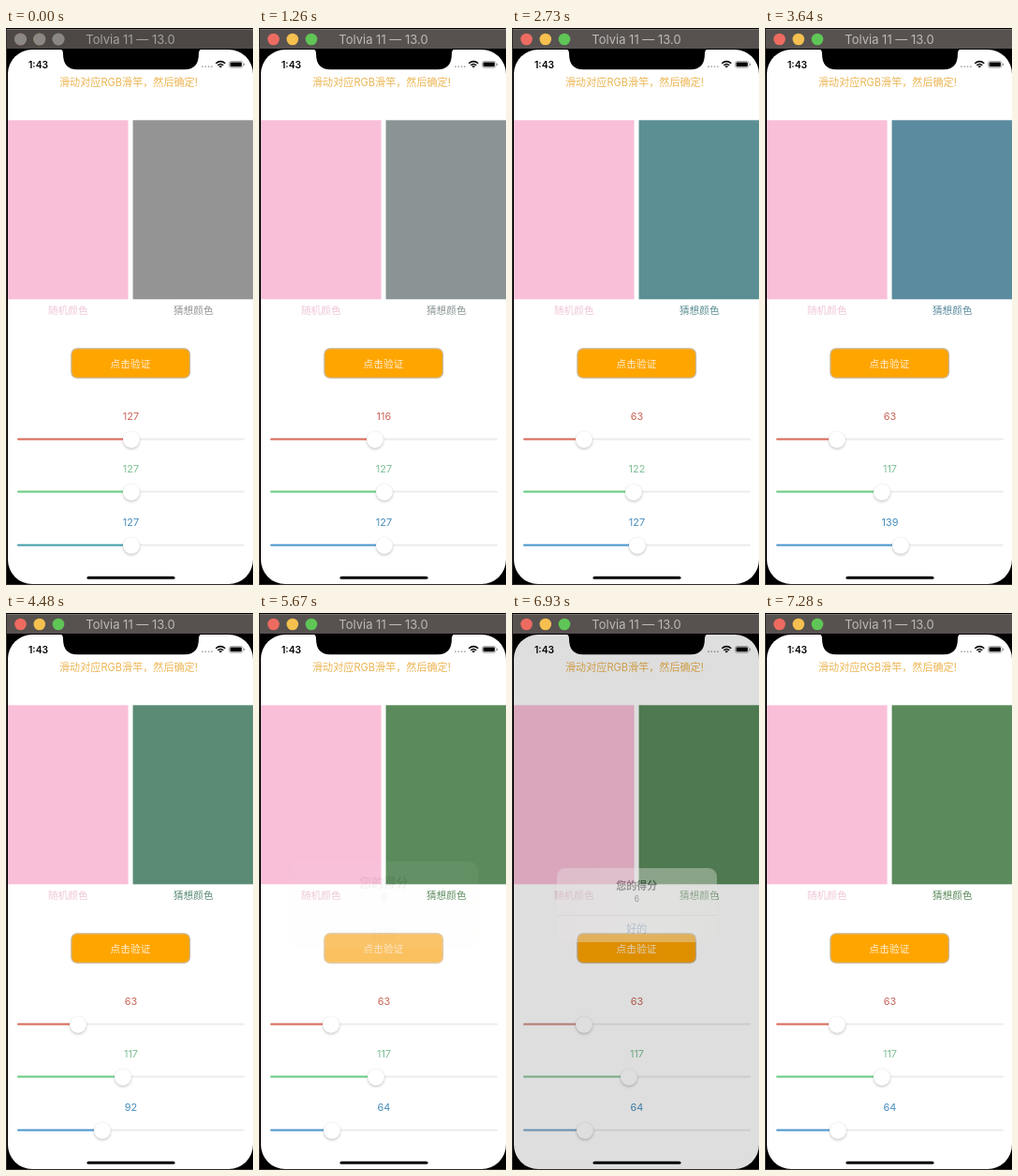
These frames come from a looping animation (264x594 px, 7350 ms). An HTML page:

```html
<!DOCTYPE html>
<html lang="zh">
<head>
<meta charset="utf-8">
<title>RGB</title>
<style>
@property --r { syntax: "<integer>"; inherits: true; initial-value: 127; }
@property --g { syntax: "<integer>"; inherits: true; initial-value: 127; }
@property --b { syntax: "<integer>"; inherits: true; initial-value: 127; }

html, body { margin: 0; width: 100%; height: 100%; overflow: hidden; background: #000; }
body {
  --loop: 7350ms;
  position: relative;
  font: 11px Inter, "Noto Sans CJK SC", "Noto Sans CJK", sans-serif;
  animation: red var(--loop) infinite, green var(--loop) infinite, blue var(--loop) infinite;
  animation-timing-function: ease-in-out;
}
svg { position: absolute; left: 0; top: 0; }
.mid { text-anchor: middle; }
.label { text-anchor: middle; font-size: 10.7px; }
.guess { fill: rgb(calc(36 + .88 * var(--r)), calc(36 + .88 * var(--g)), calc(36 + .88 * var(--b))); }

@keyframes red { 0%, 14.5% { --r: 127; } 23.81%, 100% { --r: 63; } }
@keyframes green { 0%, 33.33% { --g: 127; } 40.95%, 100% { --g: 117; } }
@keyframes blue { 0%, 46.67% { --b: 127; } 52.38% { --b: 150; } 66.67%, 100% { --b: 64; } }

/* window focus */
.bar { animation: bar var(--loop) linear infinite; }
.name { animation: name var(--loop) linear infinite; }
.idle { animation: idle var(--loop) linear infinite; }
@keyframes bar { 0%, 4.75% { fill: #4d4845; } 4.76%, 100% { fill: #575250; } }
@keyframes name { 0%, 4.75% { fill: #a5a19f; } 4.76%, 100% { fill: #bdb9b8; } }
@keyframes idle { 0%, 4.75% { opacity: 1; } 4.76%, 100% { opacity: 0; } }

/* sliders */
.slider { position: absolute; left: 0; width: 264px; height: 44px; --x: calc(21px + .89px * var(--v)); }
.slider::before {
  counter-reset: n var(--v);
  content: counter(n);
  position: absolute; left: 1.5px; width: 264px;
  line-height: 14px; text-align: center; color: var(--ink);
}
.slider i { position: absolute; left: 12px; top: 31px; height: 2px; border-radius: 1px; transform: translateY(-.6px); }
.track { width: 243px; background: #ebebec; }
.fill { width: calc(var(--x) - 12px); animation: tint var(--loop) linear infinite; }
.slider b {
  position: absolute; left: calc(var(--x) - 9px); top: 22.5px; width: 18px; height: 18px;
  border-radius: 50%; background: #fff; box-shadow: 0 1.5px 3px #0003, 0 0 1px #0002;
}
@keyframes tint {
  0%, 4.75% { background: var(--c0, var(--c)); }
  4.76%, 77.2% { background: var(--c); }
  81.63%, 91.43% { background: #c5c5c5; }
  96.19%, 100% { background: var(--c); }
}

/* button press and alert */
.press { animation: press var(--loop) linear infinite; }
.dim { animation: dim var(--loop) linear infinite; }
.alert { transform-origin: 133.5px 311.5px; animation: show var(--loop) linear infinite, zoom var(--loop) ease-out infinite; }
@keyframes press { 0%, 74.1% { opacity: 0; } 75.5%, 77.5% { opacity: .52; } 81%, 100% { opacity: 0; } }
@keyframes dim { 0%, 77.2% { opacity: 0; } 81.63%, 91.43% { opacity: 1; } 96.19%, 100% { opacity: 0; } }
@keyframes show { 0%, 76.87% { opacity: 0; } 81.63%, 91.43% { opacity: 1; } 96.19%, 100% { opacity: 0; } }
@keyframes zoom { 0%, 76.87% { transform: scale(1.2); } 81.63%, 100% { transform: none; } }
</style>
</head>
<body>
<svg width="264" height="594" viewBox="0 0 264 594">
  <rect class="bar" x="1" y="1" width="263" height="21"/>
  <path d="M1 1.5H264" stroke="#77726f"/>
  <circle cx="15.5" cy="12" r="6.3" fill="#ed6b60"/>
  <circle cx="35.8" cy="12" r="6.3" fill="#f5c04f"/>
  <circle cx="56" cy="12" r="6.3" fill="#5fc556"/>
  <g class="idle" fill="#8b8784">
    <circle cx="15.5" cy="12" r="6.5"/><circle cx="35.8" cy="12" r="6.5"/><circle cx="56" cy="12" r="6.5"/>
  </g>
  <text class="name mid" x="133" y="17" font-size="13">Tolvia 11 — 13.0</text>

  <path d="M.5 1V594M1 593.5H264" stroke="#2d2a28"/>
  <rect x="2" y="23" width="262" height="570" rx="26" fill="#fff"/>
  <path d="M57 22.5q4 0 4 5q0 16.7 15 16.7h115q15 0 15-16.7q0-5 4-5z"/>
  <text x="24" y="42.5" font-size="10.3" font-weight="600">1:43</text>
  <path d="M210 41.2h12" stroke="#aaa" stroke-width="1.8" stroke-linecap="round" stroke-dasharray="0 3.3"/>
  <g fill="none" stroke="#000" stroke-width="1.5">
    <path d="M224.3 37.8q5-4.4 10 0M226.3 39.8q3-2.6 6 0"/>
    <path d="M228 40.8h2.6l-1.3 1.3z" stroke-width=".8" fill="#000"/>
  </g>
  <rect x="238.5" y="35.5" width="14.5" height="6.8" rx="2" fill="none" stroke="#999" stroke-width=".8"/>
  <rect x="239.6" y="36.6" width="12.3" height="4.6" rx="1"/>
  <path d="M254.4 37.7v2.4" stroke="#888"/>

  <text x="57" y="62" font-size="11.1" fill="#ecb552">滑动对应RGB滑竿，然后确定!</text>
  <rect x="2" y="98.3" width="128.6" height="191" fill="#fabfd8"/>
  <rect class="guess" x="135.6" y="98.3" width="128.4" height="191"/>
  <text class="label" x="66.3" y="305" fill="#efc6d8">随机颜色</text>
  <text class="label guess" x="200.3" y="305">猜想颜色</text>

  <rect x="69.9" y="341.9" width="126.6" height="31.2" rx="6" fill="#ffa500" stroke="#c9b694" stroke-width="1.3"/>
  <text class="label" x="133" y="361.5" fill="#fff1d8" font-weight="500">点击验证</text>
  <rect class="press" x="69.2" y="341.2" width="128" height="32.6" rx="6.5" fill="#f8dcb8"/>
  <rect x="86.5" y="584.7" width="94" height="3" rx="1.5"/>
</svg>

<div class="slider" style="top:407px; --v:var(--r); --c:#dc6b5b; --ink:#cb675c"><i class="track"></i><i class="fill"></i><b></b></div>
<div class="slider" style="top:463.4px; --v:var(--g); --c:#68ce82; --ink:#7fc094"><i class="track"></i><i class="fill"></i><b></b></div>
<div class="slider" style="top:520px; --v:var(--b); --c:#4c98cf; --c0:#429fab; --ink:#4a8fbd"><i class="track"></i><i class="fill"></i><b></b></div>

<svg width="264" height="594" viewBox="0 0 264 594">
  <defs>
    <linearGradient id="glass">
      <stop stop-color="#e9e2e4"/><stop offset=".5" stop-color="#e9e7e6"/><stop offset="1" stop-color="#e2e4df"/>
    </linearGradient>
  </defs>
  <rect class="dim" x="2" y="23" width="262" height="570" rx="26" fill="#000" fill-opacity=".325"/>
  <g class="alert mid">
    <rect x="48" y="272" width="171" height="79" rx="9" fill="url(#glass)"/>
    <path d="M48 322.5H219" stroke="#c9c4c2" stroke-width=".8"/>
    <text x="133.3" y="295" font-weight="700" fill="#2b2929">您的得分</text>
    <text x="133.3" y="307.5" font-size="8.5" fill="#2b2929">6</text>
    <text x="133.3" y="341" fill="#6d90b2">好的</text>
  </g>
</svg>
</body>
</html>
```
